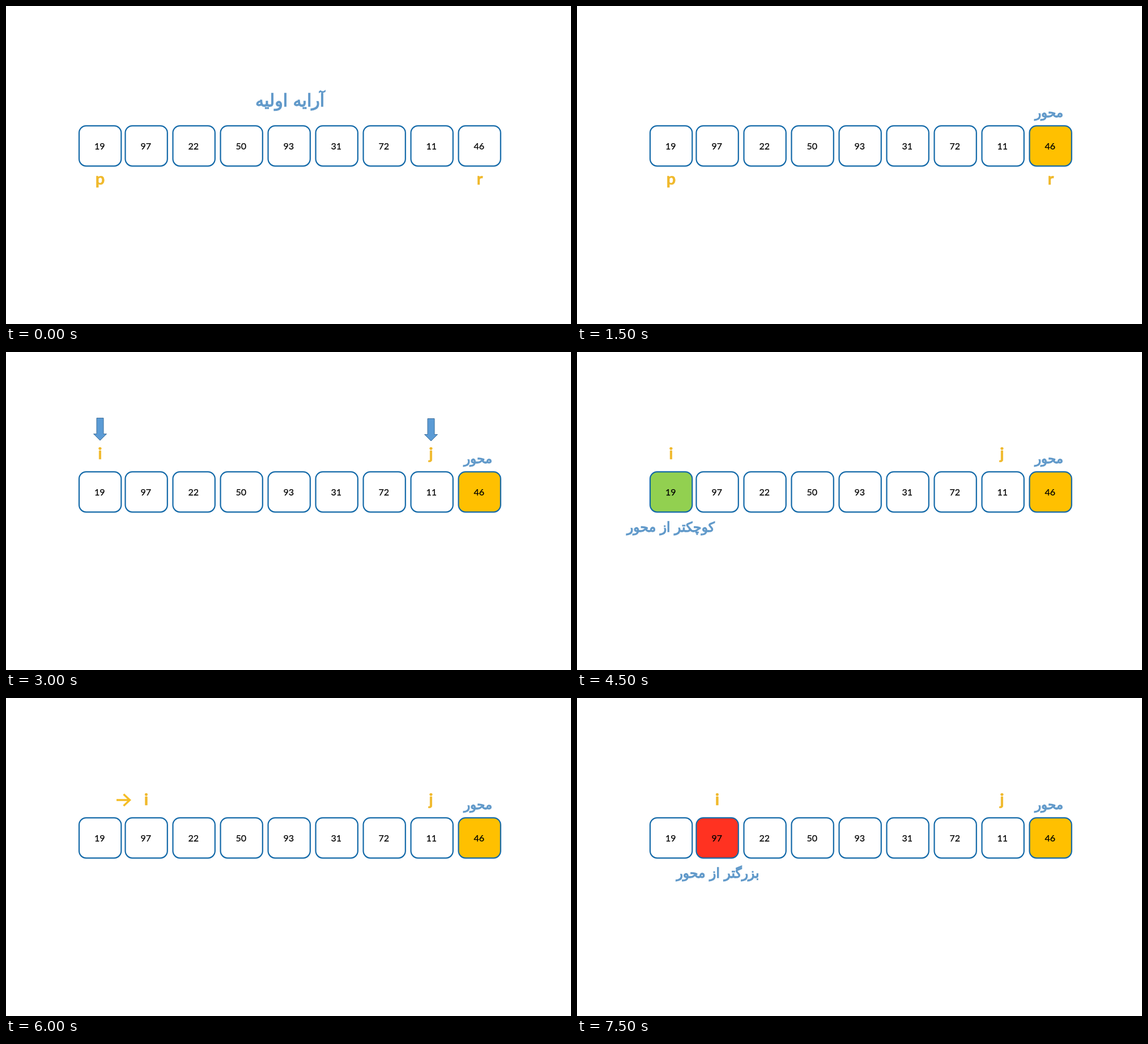
Animation of 997x561 px, one loop 8 s. Source, as an HTML page:

```html
<!DOCTYPE html>
<html lang="fa">
<head>
<meta charset="utf-8">
<title>Quicksort partition</title>
<style>
  html, body { margin: 0; width: 100%; height: 100%; overflow: hidden; background: #fff; }
  svg { display: block; width: 100vw; height: 100vh; }
  text { text-anchor: middle; }
  .cell { stroke: #1369a8; stroke-width: 2.2; }
  .number { font: 16px Lato, sans-serif; fill: #000; stroke: #000; stroke-width: .25; }
  .mark { font: bold 29px Lato, sans-serif; fill: #f0b92c; stroke: #f0b92c; stroke-width: .6; stroke-linejoin: round; }
  .caption { font-family: "DejaVu Sans", sans-serif; direction: rtl; fill: #629aca; stroke: #629aca; stroke-width: 1.3; }
  .pointer { fill: #5b9bd5; stroke: #41719c; }
  .move { fill: none; stroke: #f5bd25; stroke-width: 3.4; }
</style>
</head>
<body>
<svg id="stage" viewBox="0 0 997 561"></svg>
<script>
const STEP_MS = 1500, LOOP_MS = 8000;
const values = [19, 97, 22, 50, 93, 31, 72, 11, 46];
const PIVOT = 8;
const AMBER = '#ffc000', GREEN = '#92d050', RED = '#ff3221';
const stage = document.getElementById('stage');

const centerX = k => k ? 163.5 + 84 * k : 166;

const text = (kind, content, x, y, size) =>
  `<text class="${kind}" x="${x}" y="${y}"${size ? ` font-size="${size}"` : ''}>${content}</text>`;

const cells = fills => values.map((value, k) => {
  const x = centerX(k);
  return `<rect class="cell" x="${x - 37}" y="211.3" width="74.3" height="71" rx="12.5" fill="${fills[k] || '#fff'}"/>`
    + text('number', value, x - .7, 252.5);
}).join('');

const ends = () => text('mark', 'p', 166, 314.5) + text('mark', 'r', 836, 314.5);
const indices = i => text('mark', 'i', centerX(i), 189.3) + text('mark', 'j', 750, 189.3);
const pivotLabel = () => text('caption', 'محور', 833, 195.5, 23);
const verdict = (content, x) => text('caption', content, x, 317, 23.5);

const pointer = (x, y) =>
  `<path class="pointer" d="M${x - 6} ${y}h12v28h5.5l-11.5 11.5l-11.5 -11.5h5.5z"/>`;
const moveArrow = () =>
  '<path class="move" d="M195 180H218M207.5 169.8L218.5 180L207.5 190.2"/>';

const steps = [
  () => cells({}) + ends() + text('caption', 'آرایه اولیه', 501, 177, 30),
  () => cells({ [PIVOT]: AMBER }) + ends() + pivotLabel(),
  () => cells({ [PIVOT]: AMBER }) + pivotLabel() + indices(0)
    + pointer(166, 116.5) + pointer(750, 117.5),
  () => cells({ 0: GREEN, [PIVOT]: AMBER }) + pivotLabel() + indices(0)
    + verdict('کوچکتر از محور', 165.5),
  () => cells({ [PIVOT]: AMBER }) + pivotLabel() + indices(1) + moveArrow(),
  () => cells({ 1: RED, [PIVOT]: AMBER }) + pivotLabel() + indices(1)
    + verdict('بزرگتر از محور', 248.5),
];

let shown = -1;
const start = performance.now();

function draw() {
  const step = Math.floor((performance.now() - start) % LOOP_MS / STEP_MS);
  if (step !== shown) stage.innerHTML = steps[shown = step]();
  requestAnimationFrame(draw);
}
draw();
</script>
</body>
</html>
```
